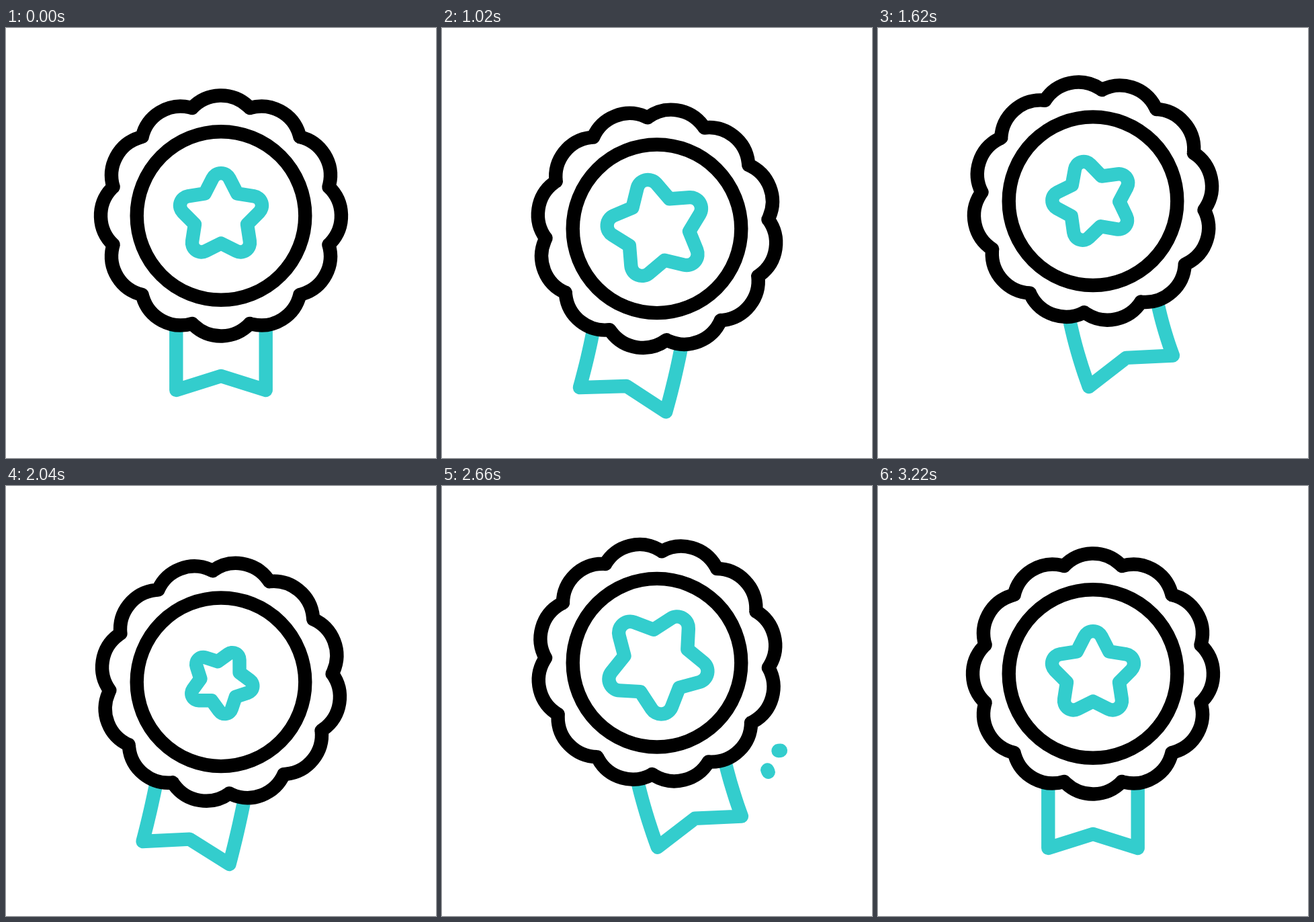
Animation of 640x640 px, one loop 3.6 s. Source, as an HTML page with a canvas:

```html
<!DOCTYPE html>
<html lang="en">
<head>
<meta charset="utf-8">
<title>Award rosette</title>
<style>
  html, body { margin: 0; height: 100%; overflow: hidden; background: #fff; }
  canvas { display: block; width: 100vw; height: 100vh; }
</style>
</head>
<body>
<canvas id="stage" width="640" height="640"></canvas>
<script>
const ctx = document.getElementById('stage').getContext('2d');
const LOOP = 3600, START = 400, END = 3220;
const BLACK = '#000', TEAL = '#33cdcd';
const RAD = Math.PI / 180;

// Eased tracks of [time, value] keys
const drop = [[START, 0], [1000, 19.5], [1600, -22], [2200, 19.5], [2800, -22], [END, 0]];
const swing = [[START, 0], [940, 11.4], [1520, -12.4], [2100, 11.4], [2680, -12.6], [END, 0]];
const bend = [[START, 0], [1000, 5.7], [1600, -10], [2200, 7], [2800, -10], [END, 0]];
const starSize = [[START, 1], [1200, 1.2], [2000, 0.75], [2800, 1.25], [END, 1]];
const spark = [[2600, 0], [2860, 1], [3120, 0]];

function track(keys, t) {
  if (t <= keys[0][0]) return keys[0][1];
  for (let i = 1; i < keys.length; i++) {
    const [t0, a] = keys[i - 1], [t1, b] = keys[i];
    if (t < t1) {
      const u = (t - t0) / (t1 - t0);
      return a + (b - a) * u * u * (3 - 2 * u);
    }
  }
  return keys[keys.length - 1][1];
}

// One full turn backwards, fastest in the middle
function starTurn(t) {
  const begin = 580, mid = 2015;
  if (t <= begin || t >= END) return 0;
  return t < mid
    ? -180 * ((t - begin) / (mid - begin)) ** 2.2
    : -360 + 180 * ((END - t) / (END - mid)) ** 2.33;
}

function stroke(color, cap = 'butt') {
  ctx.strokeStyle = color;
  ctx.lineCap = cap;
  ctx.stroke();
}

function drawRibbon(angle, curl) {
  const root = 150, length = 110;
  // Maps a point of the straight ribbon onto the swung, curled one
  const place = (x, s) => {
    const d = s - root, extra = curl * d / length;
    const mean = (angle + extra / 2) * RAD, end = (angle + extra) * RAD, base = angle * RAD;
    ctx.lineTo(
      -root * Math.sin(base) - d * Math.sin(mean) + x * Math.cos(end),
      root * Math.cos(base) + d * Math.cos(mean) + x * Math.sin(end));
  };
  const top = 162, bottom = 259.5, steps = 10;
  ctx.beginPath();
  for (let i = 0; i <= steps; i++) place(-66.7, top + (bottom - top) * i / steps);
  place(0, 238.5);
  for (let i = steps; i >= 0; i--) place(66.7, top + (bottom - top) * i / steps);
  stroke(TEAL);
}

function drawRosette(angle) {
  const half = 46.8 * RAD;
  ctx.beginPath();
  for (let i = 0; i < 12; i++) {
    const a = (angle + i * 30) * RAD;
    ctx.arc(120 * Math.cos(a), 120 * Math.sin(a), 59, a - half, a + half);
  }
  ctx.closePath();
  stroke(BLACK);
  ctx.beginPath();
  ctx.arc(0, 0, 125.3, 0, 2 * Math.PI);
  stroke(BLACK);
}

function drawStar(size, turn) {
  const at = (r, deg) => {
    const a = (turn + deg - 90) * RAD;
    return [r * size * Math.cos(a), r * size * Math.sin(a)];
  };
  ctx.beginPath();
  for (let i = 0; i < 5; i++) {
    ctx.lineTo(...at(41, i * 72 - 36));
    ctx.arcTo(...at(80, i * 72), ...at(41, i * 72 + 36), 14 * size);
  }
  ctx.closePath();
  stroke(TEAL);
}

function drawSpark(x, y, dx, dy, grow) {
  ctx.beginPath();
  ctx.moveTo(x, y);
  ctx.lineTo(x + dx * grow, y + dy * grow);
  stroke(TEAL, 'round');
}

function render() {
  const t = performance.now() % LOOP;
  const angle = track(swing, t), grow = track(spark, t);
  ctx.fillStyle = '#fff';
  ctx.fillRect(0, 0, 640, 640);
  ctx.lineWidth = 20.4;
  ctx.lineJoin = 'round';

  ctx.save();
  ctx.translate(320, 279.5 + track(drop, t));
  drawRibbon(angle, track(bend, t));
  drawRosette(angle);
  drawStar(track(starSize, t), starTurn(t));
  ctx.restore();

  if (grow > 0) {
    drawSpark(500.5, 394, 24.5, -2, grow);
    drawSpark(484.3, 422.5, 10, 23, grow);
  }
  requestAnimationFrame(render);
}
render();
</script>
</body>
</html>
```
